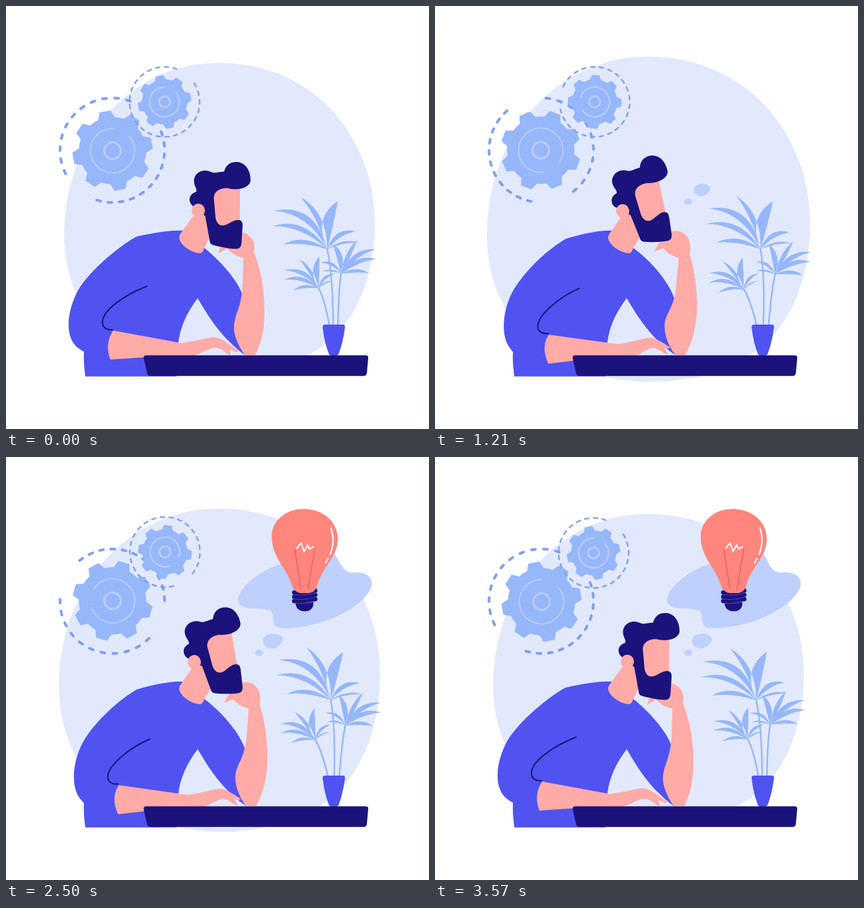
An HTML page for the animation above (3.64 s loop, 640 by 640 pixels).

```html
<!DOCTYPE html>
<html lang="en">
<head>
<meta charset="utf-8">
<title>Thinking</title>
<style>
  html, body { margin: 0; width: 100%; height: 100%; overflow: hidden; background: #fff; }
  svg { display: block; width: 100vw; height: 100vh; }
  .line { fill: none; stroke-linecap: round; stroke-linejoin: round; }
  .light { fill: #96b7fa; }
  .stem { stroke: #96b7fa; stroke-width: 2.4; }
  .blue { fill: #5053f0; }
  .dark { fill: #1c127c; }
  .skin { fill: #ffaba7; }
  .cloud { fill: #bfd0fd; }
</style>
</head>
<body>
<svg viewBox="0 0 640 640">
  <path id="backdrop" fill="#e2e9fd" d="M88,345 C88,200 190,86 322,86 C464,86 558,197 558,330 C558,420 520,500 456,528 C420,546 380,559 330,559 C190,559 88,480 88,345Z"/>

  <g id="gears"></g>

  <ellipse id="dot1" class="cloud" cx="383" cy="296" rx="6.2" ry="4.6"/>
  <path id="dot2" class="cloud" d="M389,276 C391,268 402,266 410,268 C419,270 421,276 417,281 C412,288 404,291 398,289 C391,287 388,281 389,276Z"/>
  <path id="bubble" class="cloud" d="M351,215 C355,195 385,170 420,161 C445,152 470,140 488,142 C507,146 500,172 522,175 C545,172 556,182 553,196 C545,220 505,243 470,252 C445,259 420,260 411,258 C401,254 407,240 401,233 C390,225 350,236 351,215Z"/>
  <g id="bulb">
    <path class="dark" d="M438,220 L465,219 C466,229 460,233.500 452,233.500 C444,233.500 438,229 438,220Z"/>
    <path class="line" stroke="#1c127c" stroke-width="6.500" d="M436,205 L468,202 M436,211.500 L468,208.500 M436,218 L468,215"/>
    <path class="line" stroke="#5053f0" stroke-width=".8" d="M435,208.500 Q455,211 469,205 M435,215 Q455,217 469,211.500 M438,221.500 Q455,223 467,218.500"/>
    <path fill="#ff867d" d="M450,78.500 C480,78.500 502,98 502,124 C502,152 478,166 471,194 Q468,206 456,206 H446 Q436,205 432,193 C425,168 402,152 402,120 C402,96 424,78.500 450,78.500Z"/>
    <path class="line" stroke="#ee5a5c" stroke-width="1.400" d="M437,140 L446,199 M467,140 L457,199"/>
    <path class="line" stroke="#fff" stroke-width="2" d="M440,138 L446.500,130 L451,143 L456.500,133 L459,139 L465,136 M491.500,107 C496,120 495.500,135 490.500,147 M487.500,153.500 L483.500,160"/>
  </g>

  <g id="plant"></g>
  <path class="blue" d="M482.500,482 H510 Q513.500,482 512.800,487 Q510,508 503.800,525 Q502.500,529 499,529 H493 Q489,529 488,525 Q481.500,508 479.200,487 Q478.500,482 482.500,482Z"/>

  <path id="body" class="blue"/>
  <path id="fold" class="line" stroke="#1c127c" stroke-width="2"/>
  <path id="forearm" class="skin"/>
  <path id="neck" class="skin"/>
  <path id="arm" class="skin"/>
  <g id="head">
    <path class="skin" d="M310,284 L330,270 H354 V332 L312,336Z"/>
    <path class="dark" d="M282,302 C276,297 275,285 288,281 C289,274 284,273 284.500,263 C286,250 301,246 310,251 C316,254 320,251 330,250.500 C333,240 340,236 348,236 C362,236 370,248 370,264 C369,275 351,280 335,275.500 C322,275 314,282 314.500,291 L317,320 C319,331 325,334 333,331 C343,326 347,323 353,324 C357,325 358,328 358,332 L356.500,356 C356,366 353,367.500 347,367.500 C335,367 322,364 313,361.500 Q309,360 308.500,357 L301.500,318Z"/>
    <ellipse class="skin" cx="291" cy="309.500" rx="10" ry="10.500"/>
  </g>
  <path class="dark" d="M212,528.500 H544.500 Q548.500,528.500 548,533 L546,555 Q545.500,559.800 541,559.800 H219 Q214.500,559.800 213.500,556 L208.500,534 Q207.500,528.500 212,528.500Z"/>
</svg>
<script>
const LOOP = 3640, CYCLE = 3570;
const $ = id => document.getElementById(id);
const rad = a => a * Math.PI / 180;
const polar = (r, a) => `${(r * Math.cos(rad(a))).toFixed(2)},${(r * Math.sin(rad(a))).toFixed(2)}`;
const arc = (r, from, to) =>
  `M${polar(r, from)} A${r},${r} 0 ${to - from > 180 ? 1 : 0} 1 ${polar(r, to)}`;

// Eight trapezoid teeth around a disc of radius 51
function gear(ringWidth, hubWidth) {
  let d = '';
  for (let i = 0; i < 8; i++) {
    const a = i * 45 - 101;
    d += `${i ? 'A51,51 0 0 1 ' : 'M'}${polar(51, a - 14.5)} L${polar(61, a - 8)} L${polar(61, a + 8)} L${polar(51, a + 14.5)} `;
  }
  return `<path class="light" d="${d}A51,51 0 0 1 ${polar(51, -115.5)}Z"/>
    <path class="line" stroke="#bacdfd" stroke-width="${ringWidth}" d="${arc(33.5, -40, 270)}"/>
    <circle class="line" stroke="#bacdfd" stroke-width="${hubWidth}" r="12.5"/>`;
}
// An arc of evenly spread dashes that starts and ends with a dash
function dashes(r, from, to, count, width) {
  const dash = 6, gap = (r * rad(to - from) - count * dash) / (count - 1);
  return `<path class="line" stroke="#829ef0" stroke-width="${width}" stroke-dasharray="${dash} ${gap}" d="${arc(r, from, to)}"/>`;
}
$('gears').innerHTML =
  `<g id="big"><g transform="translate(.4 .7)">${gear(1.8, 3.3)}</g>
    ${dashes(79, 153, 290, 11, 4)}${dashes(79, 339, 467, 11, 4)}</g>
  <g id="small"><g transform="translate(-.8 .5)"><g transform="scale(.67)">${gear(3.2, 4.2)}</g>
    ${dashes(53, -32, 290, 23, 2.4)}</g></g>`;

// Plant: each branch has a crown, a stem bend and leaves [tip x, tip y, bend, bend]
function leaf(cx, cy, [tx, ty, b1, b2]) {
  const dx = tx - cx, dy = ty - cy;
  const ctrl = b => `${cx + dx * .56 - dy * b},${cy + dy * .56 + dx * b}`;
  return `M${cx},${cy} Q${ctrl(b1)} ${tx},${ty} Q${ctrl(b2)} ${cx},${cy}Z`;
}
const branches = [
  { crown: [486, 368], root: 495, bend: '495,410', sway: 3.05, leaves: [
    [405, 310, .47, .28], [403, 333, .37, .2], [419, 361, .31, .11], [446, 289, .28, .1],
    [502, 295, -.42, .02], [529, 341, -.46, -.18], [534, 358, -.26, -.12]] },
  { crown: [473, 427], root: 490, bend: '483,445', sway: -4.5, leaves: [
    [421, 400, .42, .2], [421, 414, .37, .16], [435, 430, .33, .1], [444, 383, .22, .02],
    [474, 379, -.38, .02], [497, 405, -.45, -.18], [495, 416, -.3, -.12]] },
  { crown: [507, 405], root: 502, bend: '503,430', sway: 4.7, leaves: [
    [531, 354, -.18, .06], [559, 368, -.36, -.14], [560, 383, -.36, -.12], [549, 404, -.31, -.06],
    [495, 360, .36, 0], [476, 388, .45, .2], [478, 402, .32, .12]] }
];
$('plant').innerHTML = branches.map(({ crown: [x, y], root, bend, leaves }) =>
  `<g><path class="line stem" d="M${root},488 Q${bend} ${x},${y}"/>
    <path class="light" d="${leaves.map(l => leaf(x, y, l)).join('')}"/></g>`).join('');

// Limbs: rest pose and raised pose
const poses = {
  body: [
    'M271,340 C250,338 215,345 197,349 C164,368 120,407 106.500,435 C92,465 93,490 98,502 C102,514 112,520 118,523 C117,540 119,550 120,560.500 L258,560.500 C258,505 262,480 290,442 C310,476 325,500 361,528 L362,480 L357,435 C350,415 325,386 300,366Z',
    'M271,340 C250,338 220,346 198,353 C167,371 130,409 116,440 C103,470 106,496 110,508 C112,514 116,520 118,524 C117,540 119,550 120,560.500 L258,560.500 C258,505 262,480 290,442 C310,476 330,505 364,528 L366,480 L364,446 C356,420 330,388 300,366Z'],
  fold: [
    'M213,424 C180,437 146,460 146,478 C146,487 152,490 161,490',
    'M220,428 C190,441 158,470 158,486 C158,494 164,498 174,497'],
  forearm: [
    'M162,491 L265,510 C285,507 300,503 314,501 C324,501 335,510 352,522 L348,524 L338,519 L340,528 L334,526 C326,518 320,517 314,517 C305,520 295,525 285,529 L215,531 L158,535 C152,520 153,505 162,491Z',
    'M175,499 L280,512 C300,509 315,504 327,502 C336,502 345,508 357,515 L354,517 L349,516 L356,527 L350,525 C342,520 334,516 329,518 C322,522 315,525 310,529 L210,538 L175,543 C167,525 166,512 175,499Z'],
  neck: [
    'M283,318 L263,346 C257,357 279,374 294,374 Q298,373 300,366 L308,350 L304,312Z',
    'M281,320 L263,346 C257,357 279,374 294,374 Q298,373 300,366 L311,350 L298,312Z'],
  arm: [
    'M361,528 C350,512 344,495 345,485 C346,465 357,455 358,420 L359,381 C350,379 341,374 334,367 L321,375 L325,362 L345,345 C355,340 364,343 369,349 C376,355 377,365 375,372 C386,400 391,430 391,460 C391,495 384,515 377,528Z',
    'M364,528 C352,512 348,497 348,483 C349,462 364,460 367,420 L371,381 C361,378 354,374 348,366 L334,371 L343,357 L354,342 C366,338 375,339 381,345 C389,352 390,365 388,377 C395,400 398,430 398,458 C396,490 388,512 379,528Z']
};
const NUM = /[\d.]+/g;
function mix([a, b], k) {
  const to = b.match(NUM);
  let i = 0;
  return a.replace(NUM, n => (+n + (to[i++] - n) * k).toFixed(2));
}

const transform = (el, value) => el.setAttribute('transform', value);
const scaleAt = (el, x, y, s) => transform(el, `translate(${x} ${y}) scale(${s}) translate(${-x} ${-y})`);
function pop(id, t, start, x, y) {
  const u = Math.min(1, Math.max(0, (t - start) / 285));
  $(id).style.display = u ? '' : 'none';
  scaleAt($(id), x, y, u * u * (3 - 2 * u));
}

function draw(now) {
  const t = Math.min(now % LOOP, CYCLE);
  const turn = 360 * t / CYCLE;
  const lift = (1 - Math.cos(rad(turn))) / 2;

  scaleAt($('backdrop'), 323, 322, 1 + .052 * lift);
  transform($('big'), `translate(160.800 218.200) rotate(${turn})`);
  transform($('small'), `translate(240.700 144.600) rotate(${-turn})`);
  branches.forEach((b, i) => transform($('plant').children[i], `rotate(${b.sway * lift} 495 525)`));
  for (const id in poses) $(id).setAttribute('d', mix(poses[id], lift / .965));
  transform($('head'), `rotate(${-15.5 * lift} 291.500 344)`);

  pop('dot1', t, 860, 383, 296);
  pop('dot2', t, 1000, 404, 278);
  pop('bubble', t, 1305, 452, 201);
  pop('bulb', t, 1403, 452, 233);
}

const begin = performance.now();
function tick() {
  draw(performance.now() - begin);
  requestAnimationFrame(tick);
}
tick();
</script>
</body>
</html>
```
